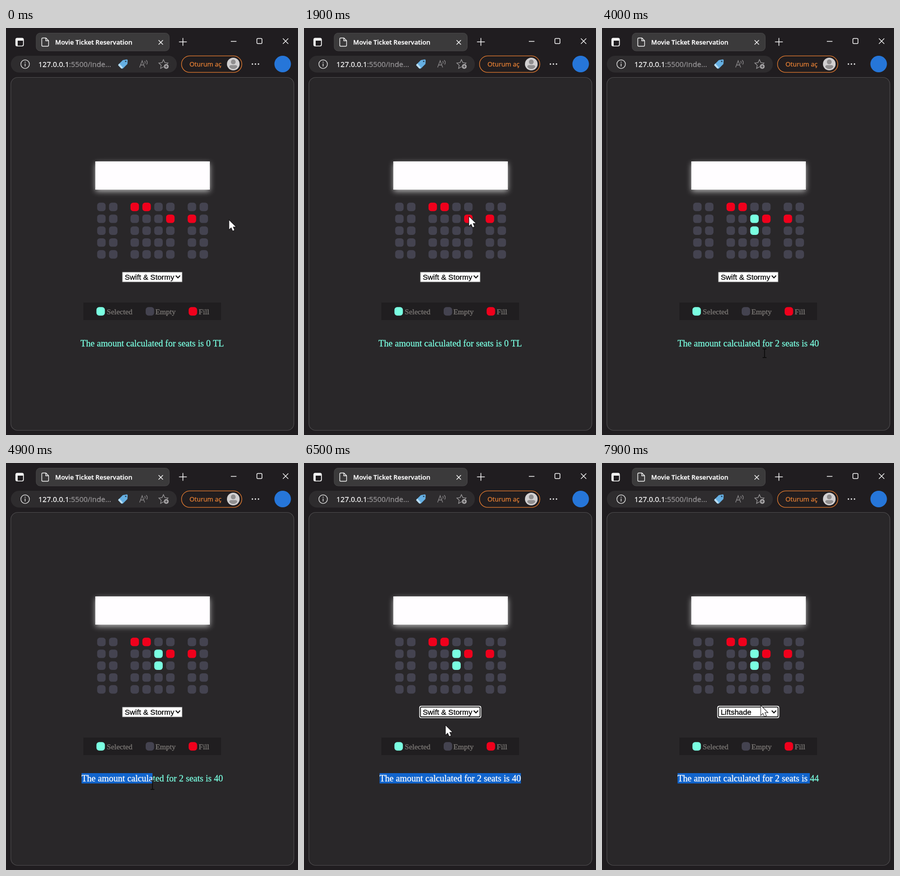
Recreate the animation shown at these times as an HTML page with a canvas. Size 600x836 px, loop 8 s.

```html
<!DOCTYPE html>
<html lang="en">
<head>
<meta charset="utf-8">
<title>Movie Ticket Reservation</title>
<style>
html, body { margin: 0; width: 100%; height: 100%; overflow: hidden; background: #201d20; }
canvas { display: block; width: 600px; height: 836px; }
</style>
</head>
<body>
<canvas id="stage" width="600" height="836"></canvas>
<script>
const ctx = document.getElementById('stage').getContext('2d');
const LOOP = 8000, STEP = 100;
const UI = '"Open Sans", "Noto Sans", sans-serif';
const SERIF = '"Liberation Serif", "Times New Roman", serif';
const SANS = '"Liberation Sans", Arial, sans-serif';
const MINT = '#7affe1', RED = '#f0001c', EMPTY = '#444350';
const SEAT = 17.4;
const COLS = [196, 220.4, 264.5, 288.9, 313.3, 337.7, 382, 406.4];
const ROWS = [367.5, 391.9, 416.2, 440.6, 465];
const TAKEN = ['2,0', '3,0', '5,1', '6,1'];
const PICKS = { '4,1': 2100, '4,2': 3100 };
const DRAG = [4600, 5200], FOCUS = 6200, CHOOSE = 6600;

// time, x, y of the pointer
const PATH = [
  [0, 459, 395], [1100, 472, 386], [1400, 468, 387], [2100, 308, 388],
  [2600, 301, 417], [3100, 309, 413], [3400, 312, 430], [4000, 334, 668],
  [4300, 230, 685], [4600, 154, 655], [5200, 448, 668], [5400, 420, 668],
  [5700, 304, 575], [6200, 300, 510], [6600, 290, 545], [7300, 322, 590],
  [7500, 328, 580], [7900, 327, 499]
];

function pointerAt(t) {
  for (let i = 1; i < PATH.length; i++) {
    const [t0, x0, y0] = PATH[i - 1], [t1, x1, y1] = PATH[i];
    if (t <= t1) {
      const u = (t - t0) / (t1 - t0), k = u * u * (3 - 2 * u);
      return [x0 + (x1 - x0) * k, y0 + (y1 - y0) * k];
    }
  }
  return PATH[PATH.length - 1].slice(1);
}

function paint(fill, stroke, width) {
  if (fill) { ctx.fillStyle = fill; ctx.fill(); }
  if (stroke) { ctx.strokeStyle = stroke; ctx.lineWidth = width; ctx.stroke(); }
}

function box(x, y, w, h, r, fill, stroke, width = 1) {
  ctx.beginPath();
  ctx.roundRect(x, y, w, h, r);
  paint(fill, stroke, width);
}

function circle(x, y, r, fill, stroke, width = 1) {
  ctx.beginPath();
  ctx.arc(x, y, r, 0, Math.PI * 2);
  paint(fill, stroke, width);
}

function shape(d, fill, stroke, width = 1, x = 0, y = 0) {
  ctx.save();
  ctx.translate(x, y);
  const p = new Path2D(d);
  if (stroke) { ctx.strokeStyle = stroke; ctx.lineWidth = width; ctx.stroke(p); }
  if (fill) { ctx.fillStyle = fill; ctx.fill(p); }
  ctx.restore();
}

// a hairline stroke gives the glyphs the heavier screen weight
function text(s, x, y, font, color) {
  ctx.font = font;
  ctx.fillStyle = ctx.strokeStyle = color;
  ctx.lineWidth = 0.3;
  ctx.lineJoin = 'round';
  ctx.fillText(s, x, y);
  ctx.strokeText(s, x, y);
  ctx.lineJoin = 'miter';
}

function star(x, y, r) {
  ctx.beginPath();
  for (let i = 0; i < 10; i++) {
    const a = -Math.PI / 2 + i * Math.PI / 5, q = i % 2 ? r * 0.48 : r;
    ctx.lineTo(x + q * Math.cos(a), y + q * Math.sin(a));
  }
  ctx.closePath();
  paint(null, '#9c9a9c', 1.3);
}

function drawTabs() {
  box(62, 10.5, 273.5, 36.5, 8, '#3b3a3b', '#484748');
  box(20.2, 21.2, 15.6, 15.8, 3, null, '#f4f4f4', 1.7);
  shape('M20 21.5h16v4.5h-16zM20 25h4v12h-4z', '#f4f4f4');
  shape('M75.5 20.5h6.5l5.5 5.5v9.5q0 2-2 2h-10q-2 0-2-2v-13q0-2 2-2zM81.8 20.7v5.5h5.5', null, '#f4f4f4', 1.4);
  text('Movie Ticket Reservation', 101, 34, '600 13.2px ' + UI, '#fff');
  shape('M313.5 25l9 9m0-9l-9 9', null, '#f4f4f4', 1.5);
  shape('M355.5 28.5h16m-8-8v16', null, '#f4f4f4', 1.5);
  shape('M462 27.5h11.5M569 21.5l11 11m0-11l-11 11', null, '#f4f4f4', 1.4);
  box(515.5, 21.5, 10.5, 10.5, 2, null, '#f4f4f4', 1.5);
}

function drawToolbar() {
  box(10, 57, 341, 34.5, 17, '#2e2c2e');
  circle(39.3, 74.3, 8.8, null, '#dedede', 1.4);
  shape('M39.3 73v6', null, '#dedede', 1.5);
  circle(39.3, 70.3, 1, '#dedede');
  text('127.0.0.1', 66.5, 80, '15px ' + UI, '#fff');
  text(':5500/inde...', 129.5, 80, '15px ' + UI, '#969496');

  shape('M231 75l9-9 8-1.5q2 0 2 2l-.5 7.5-9 9q-1.5 1-3 0l-6.5-6q-1-1 0-2z', '#65afe2');
  shape('M231 75l2-2 7 8-2 2.5q-1 0-2-1l-5-5.5q-.8-1 0-2z', '#b9ddf4');
  circle(246, 68.5, 1.5, '#29465c');

  shape('M274.5 81l5.3-14 5.2 14m-8.6-5h6.8M285 68q2 2.5 0 5.5M288 66q4 4 1 9', null, '#8b898b', 1.3);
  star(323.5, 75, 10);
  circle(329.3, 79, 5.6, '#2e2c2e');
  circle(329.3, 79, 5, '#a5a3a5');
  shape('M326.8 79h5m-2.5-2.5v5', null, '#2e2c2e', 1.2);

  box(360.6, 57.4, 124, 33.8, 16.9, '#211d1f', '#e07a30', 1.3);
  text('Oturum aç', 377, 79, '13.2px ' + UI, '#e88135');
  circle(467, 74, 13, '#d2d0d1');
  circle(467, 69.7, 4.9, '#908e8f');
  shape('M458.8 80q0-3.8 3.7-3.8h9q3.7 0 3.7 3.8-3.2 4.2-8.2 4.2t-8.2-4.2z', '#908e8f');
  for (const x of [506.3, 512.5, 518.8]) circle(x, 74, 1.5, '#f4f4f4');
  circle(568.5, 74, 17, '#2676d9');
}

function drawSeat(x, y, color) {
  box(x - SEAT / 2, y - SEAT / 2, SEAT, SEAT, 5.6, color);
}

function drawHall(t) {
  ctx.save();
  ctx.shadowColor = 'rgba(255,255,255,.7)';
  ctx.shadowBlur = 11.6;
  ctx.shadowOffsetY = 3.5;
  box(183.5, 274, 235.3, 58, 0, '#fffdff');
  ctx.restore();
  ROWS.forEach((y, r) => COLS.forEach((x, c) => {
    const key = c + ',' + r;
    const color = TAKEN.includes(key) ? RED : t >= PICKS[key] ? MINT : EMPTY;
    drawSeat(x, y, color);
  }));
}

function drawSelect(t) {
  if (t >= FOCUS) {
    box(236.8, 498.8, 127.4, 25.2, 4, '#fff');
    box(239.3, 501.3, 122.4, 20.2, 2, '#fff', '#111', 1.8);
  } else {
    box(239, 501.3, 123, 20.5, 0, '#fff', '#6f6f6f');
  }
  text(t >= CHOOSE ? 'Liftshade' : 'Swift & Stormy', 244, 516.5, '15.5px ' + SANS, '#000');
  shape('M348.8 508.5l4.5 4.7 4.5-4.7', null, '#111', 2.1);
}

function drawLegend() {
  box(159, 564, 283, 36, 0, '#201e20');
  const items = [['Selected', 194.5, 207, MINT], ['Empty', 295.7, 307, EMPTY], ['Fill', 384, 396, RED]];
  for (const [label, cx, x, color] of items) {
    drawSeat(cx, 582, color);
    text(label, x, 587.5, '15.6px ' + SERIF, '#7c7976');
  }
}

function drawTotal(t, px) {
  const seats = Object.values(PICKS).filter(p => t >= p).length;
  const price = t >= CHOOSE ? 22 : 20;
  const lead = 'The amount calculated for ' + (seats ? seats + ' ' : '') + 'seats is ';
  const line = lead + (seats ? seats * price : '0 TL');
  const font = '18.6px ' + SERIF, base = 653.7;
  ctx.font = font;
  const w = ctx.measureText(line).width, x = 300.5 - w / 2;
  text(line, x, base, font, MINT);
  if (t < DRAG[0]) return;
  let sel = w;
  if (t >= CHOOSE) sel = ctx.measureText(lead).width;
  else if (t < DRAG[1]) sel = Math.max(0, Math.min(w, px - x));
  ctx.save();
  ctx.beginPath();
  ctx.rect(x, 637, sel, 21.5);
  ctx.clip();
  ctx.fillStyle = '#1164cc';
  ctx.fillRect(x, 637, sel, 21.5);
  text(line, x, base, font, '#fff');
  ctx.restore();
}

function drawPointer(x, y) {
  const overTotal = y > 636 && y < 690;
  const overLabel = x > 307 && x < 349 && y > 574 && y < 592;
  if (overTotal || overLabel) {
    shape('M-4-9h3l1 1 1-1h3M0-8.5v17M-4 9h3l1-1 1 1h3', null, '#080808', 1.5, x, y);
  } else {
    shape('M0 0v18.5l4.2-4 3.2 7 3.2-1.4-3.1-6.8h5.8z', '#fff', '#161416', 2, x - 0.4, y);
  }
}

function draw(t) {
  ctx.fillStyle = '#201d20';
  ctx.fillRect(0, 0, 600, 836);
  drawTabs();
  drawToolbar();
  box(10, 101.5, 581.5, 725, 14, '#292729', '#4d4b4d', 1.2);
  const [x, y] = pointerAt(t);
  drawHall(t);
  drawSelect(t);
  drawLegend();
  drawTotal(t, x);
  drawPointer(x, y);
}

const start = performance.now();
function tick() {
  const t = (performance.now() - start) % LOOP;
  draw(Math.floor(t / STEP) * STEP);
  requestAnimationFrame(tick);
}
tick();
</script>
</body>
</html>
```
